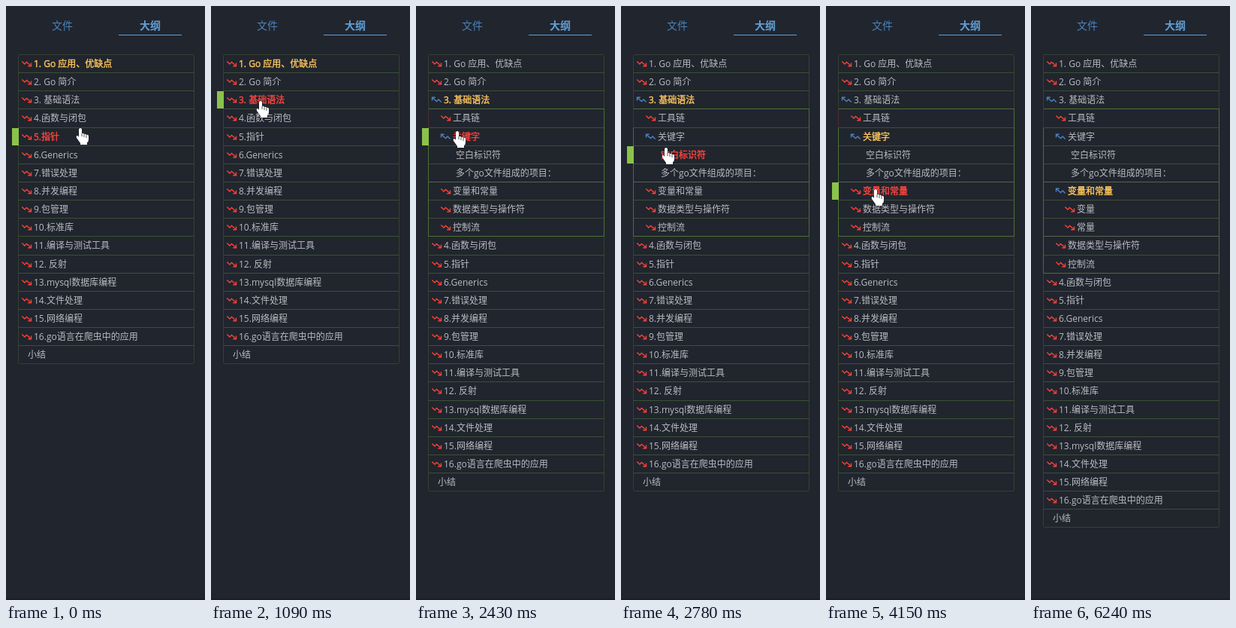
Write an HTML page with a canvas that moves like this. It is 265 by 788 pixels and loops after 6.83 s.

```html
<!DOCTYPE html>
<html lang="zh-CN">
<head>
<meta charset="utf-8">
<style>
  html, body { margin: 0; width: 265px; height: 788px; overflow: hidden; background: #21252e; }
  canvas { display: block; }
</style>
</head>
<body>
<canvas width="265" height="788"></canvas>
<script>
const ctx = document.querySelector('canvas').getContext('2d');
const LOOP = 6830, TOP = 64.58, ROW = 24.13, LEFT = 16.5, RIGHT = 250.5;
const FONT = '"Open Sans", "Noto Sans CJK SC", "Noto Sans CJK", sans-serif';
const GREY = '#b9bcc0', BLUE = '#4a83bd', RED = '#f44336', GREEN = '#4c7032';

const OPEN_BASICS = 1360, OPEN_KEYWORDS = 2430, OPEN_VARS = 4480;
const node = (text, depth = 0, shownAt = 0, openAt = Infinity, leaf = false) =>
  ({ text, depth, shownAt, openAt, leaf });

const outline = [
  node('1. Go 应用、优缺点'),
  node('2. Go 简介'),
  node('3. 基础语法', 0, 0, OPEN_BASICS),
  node('工具链', 1, OPEN_BASICS),
  node('关键字', 1, OPEN_BASICS, OPEN_KEYWORDS),
  node('空白标识符', 2, OPEN_KEYWORDS, Infinity, true),
  node('多个go文件组成的项目：', 2, OPEN_KEYWORDS, Infinity, true),
  node('变量和常量', 1, OPEN_BASICS, OPEN_VARS),
  node('变量', 2, OPEN_VARS),
  node('常量', 2, OPEN_VARS),
  node('数据类型与操作符', 1, OPEN_BASICS),
  node('控制流', 1, OPEN_BASICS),
  ...['4.函数与闭包', '5.指针', '6.Generics', '7.错误处理', '8.并发编程', '9.包管理',
    '10.标准库', '11.编译与测试工具', '12. 反射', '13.mysql数据库编程', '14.文件处理',
    '15.网络编程', '16.go语言在爬虫中的应用'].map(text => node(text)),
  node('小结', 0, 0, Infinity, true),
];

// Pointer moves: start, end, number of steps, destination x, y
const moves = [
  [190, 530, 6, 68, 136], [730, 870, 3, 66, 127],
  [1360, 1690, 4, 61, 158], [1760, 1830, 2, 61, 166],
  [2030, 2160, 2, 54, 163], [2430, 2780, 6, 60, 189],
  [2910, 3050, 3, 58, 217], [3130, 3270, 3, 66, 226],
  [3470, 3820, 6, 66, 244], [4480, 4950, 6, 72, 305],
  [5960, 6170, 4, 256, 752],
];
const clicks = [[1020, 1090], [2160, 2230], [4020, 4150]];
const activeChanges = [[0, 0], [OPEN_BASICS, 2], [2910, 4], [OPEN_VARS, 7]];

function pointerAt(t) {
  let x = 99, y = 163;
  for (const [start, end, steps, toX, toY] of moves) {
    if (t < start) break;
    const step = Math.floor((t - start) / (end - start) * (steps - 1) + 1e-6) + 1;
    const p = Math.min(1, step / steps);
    x += (toX - x) * p;
    y += (toY - y) * p;
  }
  return { x: Math.round(x), y: Math.round(y), visible: t < 6240 };
}

const rowY = i => Math.floor(TOP + i * ROW) + 0.5;

function line(color, ...points) {
  ctx.strokeStyle = color;
  ctx.beginPath();
  points.forEach(([x, y]) => ctx.lineTo(x, y));
  ctx.stroke();
}

function write(text, x, y, color, font = '12px ') {
  ctx.font = font + FONT;
  ctx.fillStyle = color;
  ctx.fillText(text, x, y);
}

// Thickens the strokes without changing the text's width
function writeStrong(text, x, y, color) {
  write(text, x, y, color);
  ctx.save();
  ctx.lineWidth = 0.4;
  ctx.strokeStyle = color;
  ctx.strokeText(text, x, y);
  ctx.restore();
}

function arrow(x, y, open) {
  const color = open ? BLUE : RED;
  ctx.save();
  ctx.translate(x + 6.5, y);
  if (open) ctx.rotate(Math.PI);
  ctx.lineWidth = 1.4;
  line(color, [-6.2, -3], [-2.6, 0.6], [0, -2], [5.6, 2.8]);
  line(color, [6, -1], [6, 3.2], [1.8, 3.2]);
  ctx.restore();
}

const hand = new Path2D('M-2 1Q-2-1 0-1Q2-1 2 1V6Q4 5 5 7Q7 6 8 8Q11 7 11 10V14' +
  'Q11 17 9 18V21H0V19L-5 12Q-6 9-4 9Q-3 9-2 11Z');

function drawPointer({ x, y }) {
  ctx.save();
  ctx.translate(x, y);
  ctx.strokeStyle = '#15181e';
  ctx.stroke(hand);
  ctx.fillStyle = '#fff';
  ctx.fill(hand);
  for (const [gapX, gapY] of [[2, 6], [5, 7], [8, 8]])
    line('#555', [gapX, gapY], [gapX, gapY + 4]);
  ctx.restore();
}

function drawTabs() {
  write('文件', 61, 31, BLUE, '14px ');
  write('大纲', 178, 31, '#609fd6', 'bold 14px ');
  line('#609fd6', [150, 38.5], [234, 38.5]);
}

function drawOutline(t, pointer) {
  const rows = outline.filter(n => t >= n.shownAt);
  const active = outline[activeChanges.findLast(([at]) => t >= at)[1]];
  const inside = pointer.visible && pointer.x < RIGHT;
  const hover = inside ? Math.floor((pointer.y - TOP) / ROW) : -1;
  const top = rowY(0), bottom = rowY(rows.length);

  ctx.strokeStyle = '#34432f';
  ctx.beginPath();
  ctx.roundRect(LEFT, top, RIGHT - LEFT, bottom - top, 2);
  ctx.stroke();

  rows.forEach((n, i) => {
    const y = rowY(i);
    if (i) line('#3b5033', [LEFT, y], [RIGHT, y]);
    const x = 37 + n.depth * 12;
    if (!n.leaf) arrow(x - 16, y + 12, t >= n.openAt);
    const textX = n.leaf ? x - 8 : x, textY = y + 16.5;
    if (i === hover) writeStrong(n.text, textX, textY, '#ff443c');
    else if (n === active) writeStrong(n.text, textX, textY, '#ffc65c');
    else write(n.text, textX, textY, GREY);
  });

  const nested = rows.filter(n => n.depth).length;
  if (nested) {
    const start = rowY(3), end = rowY(3 + nested);
    line(GREEN, [LEFT, rowY(4)], [LEFT, end], [RIGHT, end], [RIGHT, start], [LEFT, start]);
    line('#4b2d31', [LEFT, start], [LEFT, rowY(4)]);
    rows.forEach((n, i) => {
      if (n.depth === 2 && rows[i + 1].depth === 1)
        line('#56644f', [LEFT, rowY(i + 1)], [RIGHT, rowY(i + 1)]);
    });
  }
  if (rows[hover]) {
    ctx.fillStyle = '#8bc34a';
    ctx.fillRect(8, rowY(hover) + 0.5, 9, 23);
  }
}

function draw(t) {
  ctx.lineWidth = 1;
  ctx.fillStyle = '#21252e';
  ctx.fillRect(0, 0, 265, 788);
  ctx.fillStyle = '#1c1c2a';
  ctx.fillRect(0, 786, 265, 2);
  drawTabs();
  const pointer = pointerAt(t);
  drawOutline(t, pointer);
  if (!pointer.visible) return;
  drawPointer(pointer);
  if (clicks.some(([on, off]) => t >= on && t < off)) {
    ctx.fillStyle = 'rgba(255, 255, 0, 0.47)';
    ctx.beginPath();
    ctx.arc(pointer.x, pointer.y, 12, 0, Math.PI * 2);
    ctx.fill();
  }
}

const began = performance.now();
function tick() {
  draw((performance.now() - began) % LOOP);
  requestAnimationFrame(tick);
}
tick();
</script>
</body>
</html>
```
